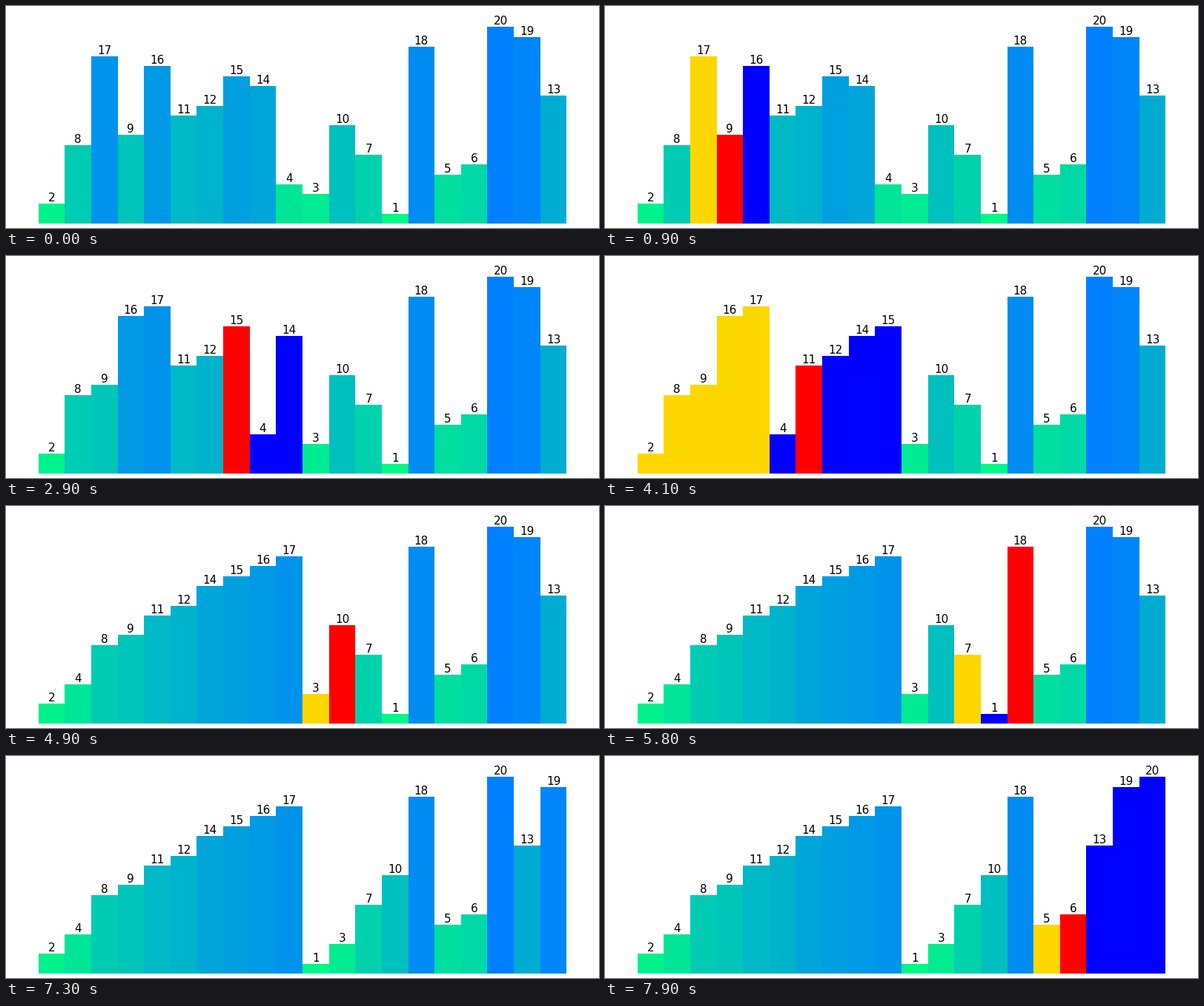
Write a matplotlib script that moves like this. It is 800 by 300 pixels and loops after 8000 ms.

```python
import matplotlib.pyplot as plt
from itertools import islice
from matplotlib.animation import FuncAnimation

START = [2, 8, 17, 9, 16, 11, 12, 15, 14, 4, 3, 10, 7, 1, 18, 5, 6, 20, 19, 13]
N = len(START)
FRAMES, INTERVAL = 80, 100
LEFT, RIGHT, PICK = "gold", "blue", "red"


def shade(v):
    t = v / N
    return (0, 1 - t / 2, 0.5 + t / 2)


def merge(a, lo, mid, hi):
    """Merge a[lo:mid] with a[mid:hi], showing each pick and then the result."""
    i, j, out = lo, mid, []
    while i < mid or j < hi:
        if j >= hi or (i < mid and a[i] <= a[j]):
            pick, i = i, i + 1
        else:
            pick, j = j, j + 1
        out.append(a[pick])
        colors = [shade(v) for v in a]
        colors[lo:hi] = [LEFT] * (mid - lo) + [RIGHT] * (hi - mid)
        colors[pick] = PICK
        yield a[:], colors
    a[lo:hi] = out
    yield a[:], [shade(v) for v in a]


def merge_sort(a, lo, hi):
    mid = (lo + hi) // 2
    if hi - lo > 2:
        yield from merge_sort(a, lo, mid)
        yield from merge_sort(a, mid, hi)
    yield from merge(a, lo, mid, hi)


def steps():
    yield START, [shade(v) for v in START]
    yield from merge_sort(START[:], 0, N)


states = list(islice(steps(), FRAMES))

fig, ax = plt.subplots(figsize=(8, 3), dpi=100)
fig.subplots_adjust(left=0.01, right=0.99, bottom=0.02, top=0.95)
ax.axis("off")
bars = ax.bar(range(N), START, width=1)
ax.set_xlim(-1.5, N + 0.5)
ax.set_ylim(0, N + 1)
labels = [ax.text(x, v, str(v), ha="center", va="bottom", fontsize=11,
                  family="DejaVu Sans") for x, v in enumerate(START)]


def draw(frame):
    values, colors = states[frame]
    for bar, label, v, color in zip(bars, labels, values, colors):
        bar.set_height(v)
        bar.set_facecolor(color)
        label.set_y(v)
        label.set_text(str(v))
    return [*bars, *labels]


anim = FuncAnimation(fig, draw, frames=FRAMES, interval=INTERVAL,
                     repeat=True, repeat_delay=0, blit=False)
plt.show()
```
